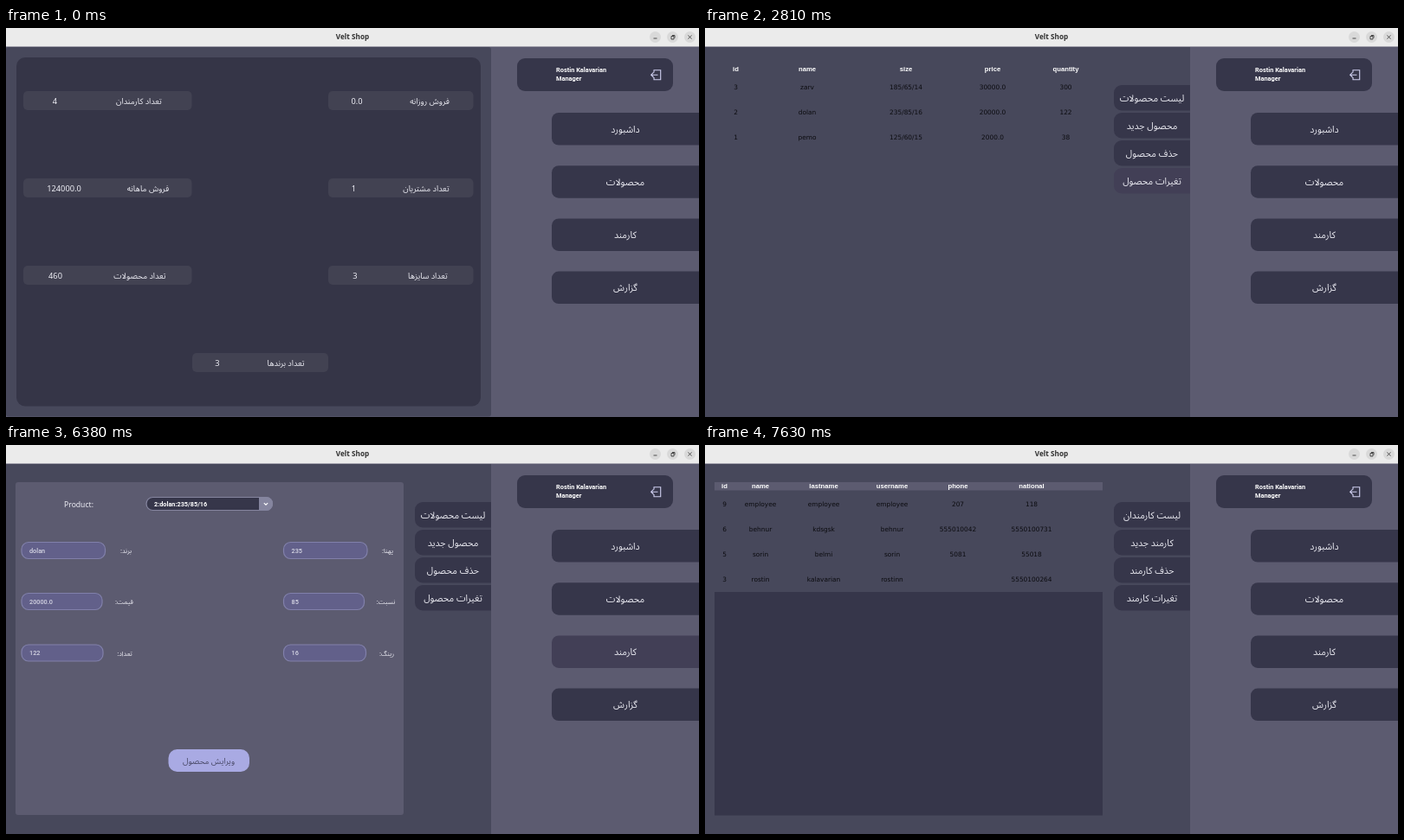
An HTML page with a canvas for the animation above (8000 ms loop, 800 by 450 pixels).

```html
<!DOCTYPE html>
<html lang="fa">
<head>
<meta charset="utf-8">
<style>
html, body { margin: 0; width: 100%; height: 100%; overflow: hidden; }
canvas { display: block; }
</style>
</head>
<body>
<canvas id="stage" width="800" height="450"></canvas>
<script>
const ctx = document.getElementById('stage').getContext('2d');
const LOOP = 8000;
const NOTO = '"Noto Sans", "Noto Sans Arabic", "DejaVu Sans", sans-serif';
const ROBOTO = 'Roboto, sans-serif';
const DEJAVU = '"DejaVu Sans", sans-serif';
const ARIAL = '"Liberation Sans", sans-serif';
const PAGE = '#47485b', SIDE = '#5c5b70', DARK = '#36364a', HOVER = '#423f56', LIGHT = '#ededf4';

const cards = [
  // x, y, width, value, value centre, label, label centre
  [20, 73, 194.5, '4', 56.5, 'تعداد کارمندان', 153.5],
  [372, 73, 167.5, '0.0', 405, 'فروش روزانه', 489],
  [20, 174, 194.5, '124000.0', 67, 'فروش ماهانه', 164],
  [372, 174, 167.5, '1', 401.5, 'تعداد مشتریان', 485],
  [20, 275, 194.5, '460', 57, 'تعداد محصولات', 154.5],
  [372, 275, 167.5, '3', 403, 'تعداد سایزها', 487],
  [215, 376, 157, '3', 244, 'تعداد برندها', 323]
];
const products = {
  columns: [35.5, 118, 232, 332, 416.5],
  rows: ['id name size price quantity', '3 zarv 185/65/14 30000.0 300',
    '2 dolan 235/85/16 20000.0 122', '1 pemo 125/60/15 2000.0 38'],
  menu: ['لیست محصولات', 'محصول جدید', 'حذف محصول', 'تغیرات محصول']
};
const employees = {
  columns: [22.5, 64, 137, 216, 292, 377],
  rows: ['id name lastname username phone national', '9 employee employee employee 207 118',
    '6 behnur kdsgsk behnur 555010042 5550100731', '5 sorin belmi sorin 5081 55018',
    '3 rostin kalavarian rostinn - 5550100264'],
  menu: ['لیست کارمندان', 'کارمند جدید', 'حذف کارمند', 'تغیرات کارمند']
};
const fields = [
  // x, y, width, label, label centre, value
  [17.5, 112, 97.5, 'برند:', 138.5, 'dolan'],
  [320, 112, 97.5, 'پهنا:', 440.5, '235'],
  [17.5, 171, 94, 'قیمت:', 136.5, '20000.0'],
  [320, 171, 94, 'نسبت:', 438.5, '85'],
  [17.5, 230.5, 95, 'تعداد:', 137, '122'],
  [320, 230.5, 96, 'رینگ:', 439.5, '16']
];
const options = ['1:pemo:125/60/15', '2:dolan:235/85/16', '3:zarv:185/65/14'];
const sideMenu = ['داشبورد', 'محصولات', 'کارمند', 'گزارش'];

function box(x, y, w, h, fill, r = 0, stroke) {
  ctx.beginPath();
  ctx.roundRect(x, y, w, h, r);
  ctx.fillStyle = fill;
  ctx.fill();
  if (stroke) {
    ctx.strokeStyle = stroke;
    ctx.lineWidth = 1.2;
    ctx.stroke();
  }
}

function text(str, x, y, size, font = NOTO, color = LIGHT, align = 'center', weight = 400) {
  ctx.font = `${weight} ${size}px ${font}`;
  ctx.fillStyle = color;
  ctx.textAlign = align;
  ctx.direction = /[\u0600-\u06ff]/.test(str) ? 'rtl' : 'ltr';
  ctx.fillText(str, x, y + size * 0.35);
}

function line(path, color, width) {
  ctx.strokeStyle = color;
  ctx.lineWidth = width;
  ctx.stroke(new Path2D(path));
}

function titleBar() {
  box(0, 0, 800, 21.5, '#ebebeb');
  text('Velt Shop', 400, 10.5, 8.2, NOTO, '#303030', 'center', 700);
  for (const x of [749.5, 769.5, 789.5]) box(x - 6.5, 4, 13, 13, '#d9d9d9', 6.5);
  line('M747.5 12h4M768 9.5h3v3.5h-3zM769 8.5h3v3M787.5 8.5l4 4m0-4l-4 4', '#3a3a3a', 0.9);
}

function sidebar(hovered) {
  box(590, 35, 180, 38, DARK, 9);
  text('Rostin Kalavarian', 635, 48.5, 7.4, ROBOTO, '#fff', 'left', 700);
  text('Manager', 635, 58.5, 7.4, ROBOTO, '#fff', 'left', 700);
  line('M748 51.5V48.7h7.7v11H748V57M752.5 54.2H744.7M747.5 51.4l-2.8 2.8 2.8 2.8', '#cfcff0', 1.1);
  sideMenu.forEach((label, i) => {
    const y = 98 + i * 61.2;
    box(630, y, 190, 37.5, i === hovered ? HOVER : DARK, 8);
    text(label, 715, y + 19, 10.7);
  });
}

function subMenu(labels, hovered) {
  labels.forEach((label, i) => {
    const y = 66 + i * 32;
    box(472, y, 88, 29.5, i === hovered ? HOVER : DARK, [9, 0, 0, 9]);
    text(label, 516, y + 15, 10.7);
  });
}

function dashboard(solid) {
  if (solid) box(12, 34, 536, 403.5, '#353547', 10);
  for (const [x, y, w, value, vx, label, lx] of cards) {
    if (!solid) box(x, y, w, 22, '#38394a');
    box(x, y, w, 22, solid ? '#424252' : '#444555', 5);
    text(value, vx, y + 11.3, 9.3);
    text(label, lx, y + 11.3, 9.3);
  }
}

function table({ columns, rows }, solid) {
  const top = 53 + (rows.length - 1) * 29.25;
  if (solid) {
    box(11, 43, 448, 9.5, SIDE);
    box(11, top, 448, 428.5 - top, DARK);
  }
  rows.forEach((row, r) => row.split(' ').forEach((cell, c) => {
    if (cell === '-') return;
    if (r) text(cell, columns[c], 38.7 + r * 29.25, 7.4, DEJAVU, '#0c0c10');
    else text(cell, columns[c], 47.3, 7.7, ARIAL, '#fff', 'center', 700);
  }));
}

function form(t, solid) {
  const chosen = t >= 5440, open = t >= 4310 && !chosen;
  if (solid) box(11, 43, 448, 385, SIDE, 3);
  text('Product:', 84, 68.5, 8.6);
  box(162, 60.5, 145.5, 15, DARK, 7.5, '#85859f');
  box(292, 60, 16, 16, open ? '#74748e' : '#85859f', [0, 7.5, 7.5, 0]);
  line('M297.8 67.2l2.2 2 2.2-2', '#fff', 1.1);
  text(options[chosen ? 1 : 0], 171, 68, 7.3, ROBOTO, '#fff', 'left', 600);
  for (const [x, y, w, label, lx, value] of fields) {
    box(x + 0.5, y + 0.5, w - 1, 19, '#62608a', 8, '#8180aa');
    text(label, lx, y + 10.5, 7.6);
    if (chosen) text(value, x + 9.5, y + 10, 7.3, ROBOTO, '#d6d6e4', 'left', 500);
  }
  box(187.5, 352, 93.5, 26, '#a9aae3', 10);
  text('ویرایش محصول', 234, 365.5, 9.3, NOTO, '#484866');
  if (open) {
    const hovered = t < 4810 ? -1 : t < 4870 ? 0 : t < 5000 ? 2 : 1;
    box(161.5, 76, 80, 38, DARK);
    options.forEach((option, i) => {
      const y = 77 + i * 12;
      if (i === hovered) box(162, y, 79, 12, SIDE);
      text(option, 168, y + 6, 7.3, ROBOTO, '#fff', 'left', 500);
    });
  }
}

// A page that is left first loses its panel, then its contents dim and vanish.
function leaving(t, start, end, draw) {
  if (t >= end) return;
  ctx.globalAlpha = t < start + 60 ? 1 : 0.4;
  draw(t < start);
  ctx.globalAlpha = 1;
}

function show(t, start, leave, end, draw) {
  if (t < start) return;
  if (t < leave) draw(true);
  else leaving(t, leave, end, draw);
}

function sideHover(t) {
  if (t >= 940 && t < 2250 || t >= 6190 && t < 6310) return 1;
  return t >= 6310 && t < 7630 ? 2 : -1;
}

function render(t) {
  box(0, 0, 800, 450, SIDE);
  if (t < 1500) box(0, 22, 560, 427.5, PAGE, 3);
  else box(0, 22, 560, 428, PAGE);
  titleBar();
  sidebar(sideHover(t));

  show(t, 0, 1380, 1500, dashboard);
  show(t, 1750, 2810, 2940, solid => table(products, solid));
  show(t, 3000, 6810, 6930, solid => form(t, solid));
  show(t, 7060, LOOP, LOOP, solid => table(employees, solid));

  if (t >= 1810 && t < 6870) subMenu(products.menu, t >= 2440 && t < 3690 ? 3 : -1);
  if (t >= 7130) subMenu(employees.menu, -1);
}

const start = performance.now();
function tick() {
  render((performance.now() - start) % LOOP);
  requestAnimationFrame(tick);
}
tick();
</script>
</body>
</html>
```
